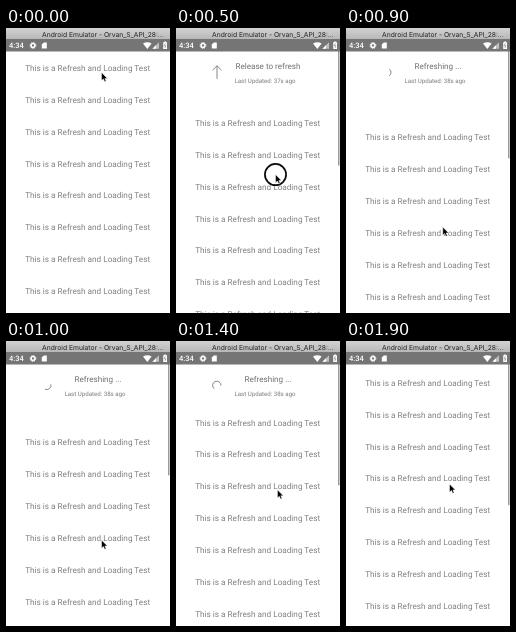
Recreate the animation shown at these times as an HTML page. Size 164 by 285 pixels, loop 2000 ms.

```html
<!DOCTYPE html>
<html lang="en">
<head>
<meta charset="utf-8">
<title>Pull to refresh</title>
<style>
  html, body { margin: 0; width: 100%; height: 100%; overflow: hidden; background: #fff; }
  svg { display: block; width: 164px; height: 285px; }
  text { font-family: Roboto, sans-serif; text-rendering: geometricPrecision; }
  .row { font-size: 8.2px; fill: #808080; }
  .title { font-size: 8.1px; fill: #707070; text-anchor: middle; }
  .updated { font-size: 6.15px; fill: #7c7c7c; text-anchor: middle; }
  .window { font: 6.75px Inter, sans-serif; fill: #222; }
  .clock { font-size: 7.5px; font-weight: 500; fill: #fff; }
  .line { fill: none; stroke: #7a7a7a; stroke-width: .9; }
</style>
</head>
<body>
<svg viewBox="0 0 164 285">
  <defs>
    <linearGradient id="chrome" x2="0" y2="1">
      <stop stop-color="#d2d2d2"/><stop offset="1" stop-color="#b6b6b6"/>
    </linearGradient>
  </defs>
  <rect width="164" height="285" fill="#fff"/>

  <text class="title" id="title" x="92" y="41.2"></text>
  <text class="updated" id="updated" x="89" y="55.2"></text>
  <path class="line" id="arrow" d="M0 -6.5V6.5M-4.4 2.2L0 6.5L4.4 2.2"/>
  <path class="line" id="spinner"/>

  <g id="list"><rect y="24" width="164" height="290" fill="#fff"/></g>
  <rect id="scrollbar" x="162" y="23" width="1.5" fill="#9a9a9a"/>

  <rect width="164" height="11.5" fill="url(#chrome)"/>
  <text class="window" x="36" y="8.5">Android Emulator - Orvan_S_API_28:...</text>
  <rect y="11" width="164" height="12.5" fill="#757575"/>
  <text class="clock" x="3" y="20.2">4:34</text>
  <g fill="#fff">
    <circle cx="27" cy="17.5" r="1.9" fill="none" stroke="#fff" stroke-width="1.5"/>
    <circle cx="27" cy="17.5" r="2.9" fill="none" stroke="#fff" stroke-dasharray="1.2 1.08"/>
    <path d="M37.8 14.6H40.8V20.6H35.8V16.6Z"/>
    <path d="M137 15.6Q141.3 12.8 145.6 15.6L141.3 21Z"/>
    <path d="M153 14.2V20.8H146.4Z" opacity=".55"/>
    <path d="M150 17.2V20.8H146.4Z"/>
    <path d="M157.2 14.2H158.2V13.6H160V14.2H161V20.9H157.2Z"/>
    <path d="M159.4 15.2L158.2 17.8H160L158.9 19.9" fill="none" stroke="#757575" stroke-width=".6"/>
  </g>

  <g id="pointer">
    <circle id="press" r="10.6" fill="none" stroke="#0a0a0a" stroke-width="1.7"/>
    <path d="M0 0V8.2L1.9 6.5L3.2 9.3L4.6 8.7L3.4 6H5.9Z" fill="#000" stroke="#fff" stroke-width=".5"/>
  </g>
</svg>
<script>
const LOOP = 2000, STEP = 100, ROW = 31.87, HEADER = 41.5, DRAG = 156;
const $ = id => document.getElementById(id);

// Smoothstep from 0 to 1 between two times
function ease(t, from, to) {
  const p = Math.min(1, Math.max(0, (t - from) / (to - from)));
  return p * p * (3 - 2 * p);
}

const dragged = t => DRAG * ease(t, -50, 850);
const stretch = distance => 105 * (1 - Math.exp(-distance / 140));

// Damped pull, settling on the header height, then closing
function pullOffset(t) {
  if (t === 0) return 0;
  const overshoot = stretch(DRAG) - HEADER;
  return stretch(dragged(t)) - overshoot * ease(t, 850, 1250) - HEADER * ease(t, 1480, 1960);
}

function pointerAt(t) {
  const sway = t < 1000 ? 4 * Math.sin(Math.PI * t / 1000) : 8 * ease(t, 1000, 1600);
  return [95.5 + sway, 43 + dragged(t) - 56 * ease(t, 1000, 1500)];
}

function arc(r, start, sweep) {
  const point = deg => {
    const a = deg * Math.PI / 180;
    return `${40.8 + r * Math.cos(a)} ${44.4 + r * Math.sin(a)}`;
  };
  return `M${point(start)}A${r} ${r} 0 ${sweep > 180 ? 1 : 0} 1 ${point(start + sweep)}`;
}

function show(el, visible) {
  el.setAttribute("visibility", visible ? "visible" : "hidden");
}

for (let i = 0; i < 9; i++) {
  const row = document.createElementNS("http://www.w3.org/2000/svg", "text");
  row.setAttribute("class", "row");
  row.setAttribute("x", 19.2);
  row.setAttribute("y", 43 + i * ROW);
  row.textContent = "This is a Refresh and Loading Test";
  $("list").append(row);
}

function draw(t) {
  const offset = pullOffset(t);
  const refreshing = t >= 900 && t < 1500;
  $("list").setAttribute("transform", `translate(0 ${offset})`);
  $("title").textContent = t < 500 ? "Pull down to refresh"
    : t < 900 ? "Release to refresh"
    : refreshing ? "Refreshing ..." : "Refresh completed";
  $("updated").textContent = `Last Updated: ${t < 800 ? 37 : 38}s ago`;

  show($("arrow"), t < 900);
  $("arrow").setAttribute("transform", `translate(41 44.3) rotate(${180 * ease(t, 200, 500)})`);
  show($("spinner"), refreshing);
  const spin = t - 1000;
  $("spinner").setAttribute("d", arc(4.2, -15 + spin * .36, 130 + spin * .26));

  show($("scrollbar"), t > 0);
  $("scrollbar").setAttribute("height", 142 - offset / 2);
  show($("press"), t >= 100 && t < 900);
  $("pointer").setAttribute("transform", `translate(${pointerAt(t)})`);
}

function tick() {
  const t = performance.now() % LOOP;
  draw(Math.floor(t / STEP) * STEP);
  requestAnimationFrame(tick);
}
tick();
</script>
</body>
</html>
```
